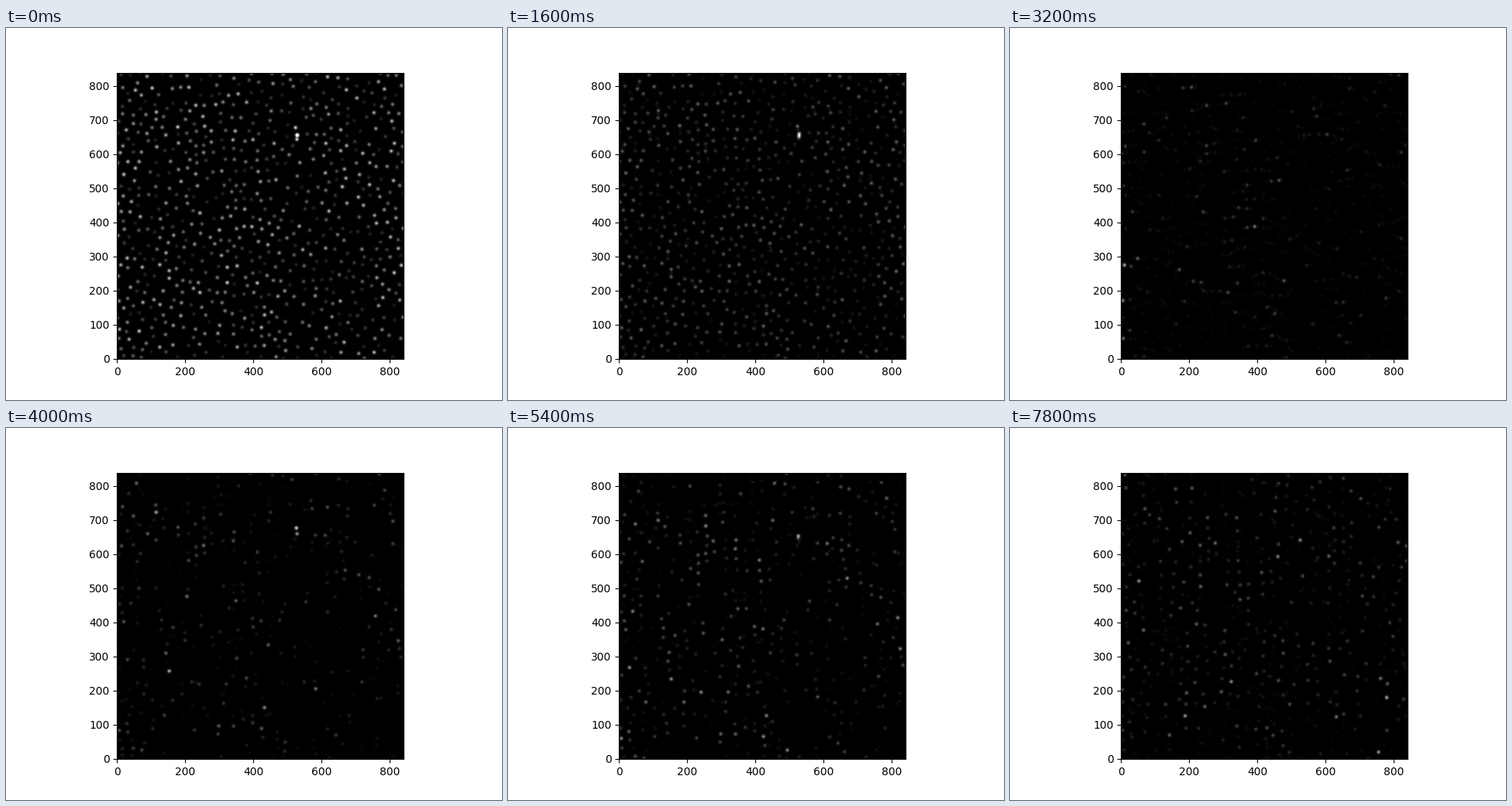
Animation, 640 px wide and 480 px high, one loop 8 s. Source, as a matplotlib script:

```python
import numpy as np
import matplotlib.pyplot as plt
from matplotlib.animation import FuncAnimation

SIZE = 840
FRAMES = 40
PAD = 24
COUNT = 720
MIN_GAP = 21
SIGMA = 3.4

# The brightest stars; all others are scattered at random.
BRIGHT = [
    (528, 655), (527, 643), (523, 677), (178, 679), (65, 81), (323, 223),
    (812, 252), (20, 540), (833, 274), (103, 793), (411, 222), (660, 504),
    (243, 194), (30, 295), (323, 268), (300, 377), (243, 427), (395, 387),
    (760, 397), (810, 522), (153, 258), (153, 236), (617, 826), (355, 776),
]


def scatter(rng):
    """Bright stars plus random ones that keep their distance."""
    pts = np.array(BRIGHT, float)
    while len(pts) < COUNT:
        p = rng.uniform(0, SIZE, 2)
        if np.hypot(*(pts - p).T).min() > MIN_GAP:
            pts = np.vstack([pts, p])
    return pts


def star_field():
    rng = np.random.default_rng(12)
    pts = scatter(rng)
    n = len(BRIGHT)
    amps = 0.12 + 0.68 * rng.random(COUNT) ** 1.3
    amps[:n] = np.linspace(0.9, 0.75, n)
    amps[0] = 1.8

    field = np.zeros((SIZE + 2 * PAD, SIZE + 2 * PAD))
    span = np.arange(-PAD, PAD)
    for (x, y), amp in zip(pts, amps):
        ix, iy = int(x), int(y)
        gx = np.exp(-((span + ix - x) / SIGMA) ** 2 / 2)
        gy = np.exp(-((span + iy - y) / SIGMA) ** 2 / 2)
        field[iy:iy + 2 * PAD, ix:ix + 2 * PAD] += amp * np.outer(gy, gx)
    return field[PAD:-PAD, PAD:-PAD]


field = star_field()
# (sign, axis) of the shift: down, right, up in turn
MOVES = [(-1, 0), (1, 1), (1, 0)]


def overlap(k):
    """Geometric mean of the field and its copy shifted by k cells."""
    sign, axis = MOVES[k % 3]
    return np.sqrt(field * np.roll(field, sign * k, axis=axis))


fig, ax = plt.subplots(figsize=(6.4, 4.8), dpi=100)
image = ax.imshow(overlap(0), cmap="gray", vmin=0, vmax=1, origin="lower")


def update(k):
    image.set_data(overlap(k))
    return [image]


anim = FuncAnimation(fig, update, frames=FRAMES, interval=200,
                     repeat=True, repeat_delay=0)
plt.show()
```
